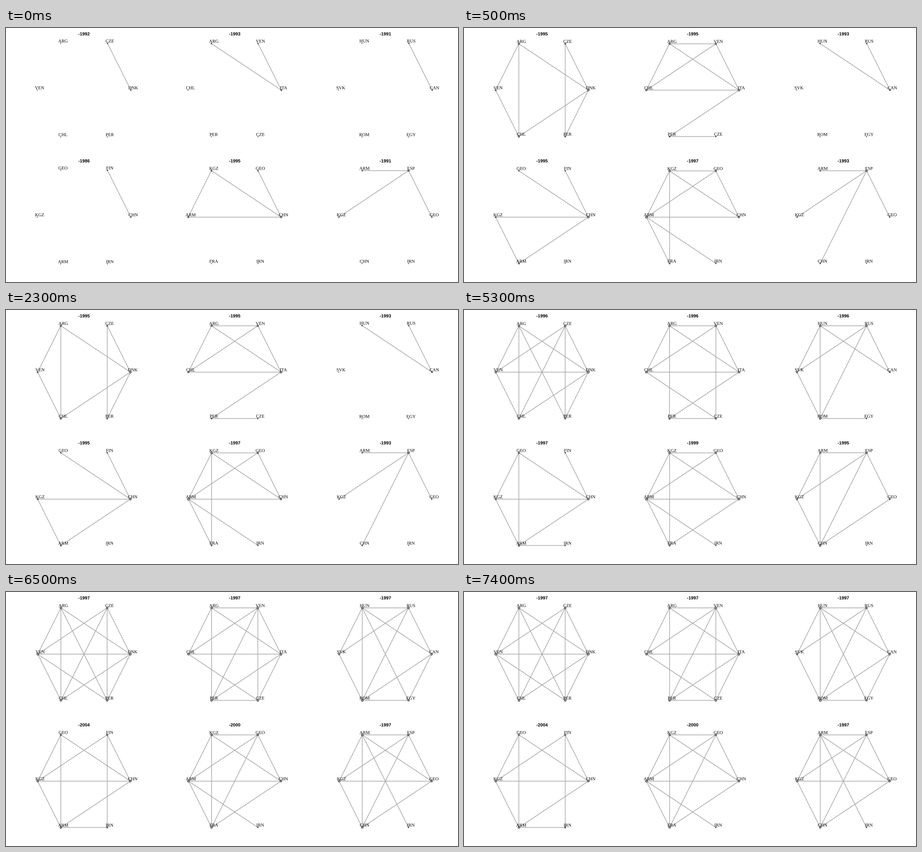
Recreate the animation shown at these times as a matplotlib script. Size 998 by 561 pixels, loop 8000 ms.

```python
import matplotlib.pyplot as plt
import numpy as np
from matplotlib.animation import ArtistAnimation
from matplotlib.collections import LineCollection
from matplotlib.patches import Circle, PathPatch
from matplotlib.path import Path
from matplotlib.textpath import TextPath

W, H, DPI = 998, 561, 72
STEP = 500                  # ms per frame
HOLDS = (1, 6, 6, 3)        # frames each stage stays

SERIF = dict(family="Liberation Serif")
BOLD = dict(family="Liberation Sans", weight="bold")
FONT_SIZE = 9.9
LABEL_SHIFT = 5.2           # labels sit up and to the right of their node

# Nodes run counter-clockwise from the right, on a unit frame with y down.
LAYOUT = np.array([(1, 0), (.5, -1), (-.5, -1), (-1, 0), (-.5, 1), (.5, 1)])

# Per panel: node labels, year of each stage, edges added at each stage.
PANELS = [
    ("DNK CZE ARG VEN CHL PER", "1992 1995 1996 1997",
     ["01", "23 24 02 34 04 15 05", "25 13 14 03", "35"]),
    ("ITA VEN ARG CHL PER CZE", "1993 1995 1996 1997",
     ["01 02", "12 23 13 03 04 45", "24 15 35", "14 05"]),
    ("CAN RUS HUN SVK ROM EGY", "1991 1993 1996 1997",
     ["01", "02", "12 23 24 13 14 34 45", "25 04 05"]),
    ("CHN FIN GEO KGZ ARM IRN", "1986 1995 1997 2004",
     ["01", "02 03 34 04", "23 24 45", "13 15"]),
    ("CHN GEO KGZ ARM FRA IRN", "1995 1997 1999 2000",
     ["01 02 23 03", "12 24 13 34 35", "04", "14"]),
    ("GEO ESP ARM KGZ CHN IRN", "1991 1993 1995 1997",
     ["12 13 01", "14", "23 24 34 04", "25 02 03"]),
]

fig = plt.figure(figsize=((W + .01) / DPI, (H + .01) / DPI), dpi=DPI,
                 facecolor="white")
ax = fig.add_axes([0, 0, 1, 1])
ax.set(xlim=(0, W), ylim=(H, 0))
ax.axis("off")


def write(text, x, baseline, font, sample=None):
    """Text centred on x; `sample` sets the width used for centring."""
    box = TextPath((0, 0), sample or text, size=FONT_SIZE, prop=font).get_extents()
    glyphs = TextPath((0, 0), text, size=FONT_SIZE, prop=font)
    left = x - (box.x0 + box.x1) / 2
    outline = Path(glyphs.vertices * [1, -1] + [left, baseline], glyphs.codes)
    return ax.add_patch(PathPatch(outline, fc="black", lw=0, zorder=3,
                                  snap=False))


def draw_panel(index, stage):
    labels, years, added = PANELS[index]
    row, col = divmod(index, 3)
    center = np.array([172.28 + col * W / 3, 137.27 + row * H / 2])

    edges = [(int(a), int(b)) for a, b in " ".join(added[:stage + 1]).split()]
    degree = np.bincount(np.ravel(edges), minlength=6)
    size = np.sqrt(degree) / 100
    scale = 104.45 / (1 + size.max())    # larger nodes shrink the layout
    points = center + scale * LAYOUT

    lines = LineCollection([points[list(e)] for e in edges], snap=False,
                           colors="darkgrey", linewidths=1.45, zorder=1)
    artists = [ax.add_collection(lines)]
    for (x, y), s, label in zip(points, size, labels.split()):
        node = Circle((x, y), max(s * scale, .5), fc="darkgrey", ec="black",
                      lw=.75, zorder=2, snap=False)
        baseline = y - LABEL_SHIFT + FONT_SIZE / 3
        artists += [ax.add_patch(node),
                    write(label, x + LABEL_SHIFT, baseline, SERIF)]
    artists.append(write("-" + years.split()[stage], center[0],
                         16.4 + row * H / 2, BOLD, sample="-0000"))
    return artists


frames = []
for stage, hold in enumerate(HOLDS):
    artists = [a for i in range(len(PANELS)) for a in draw_panel(i, stage)]
    frames += [artists] * hold

anim = ArtistAnimation(fig, frames, interval=STEP, repeat=True, repeat_delay=0)
plt.show()
```
